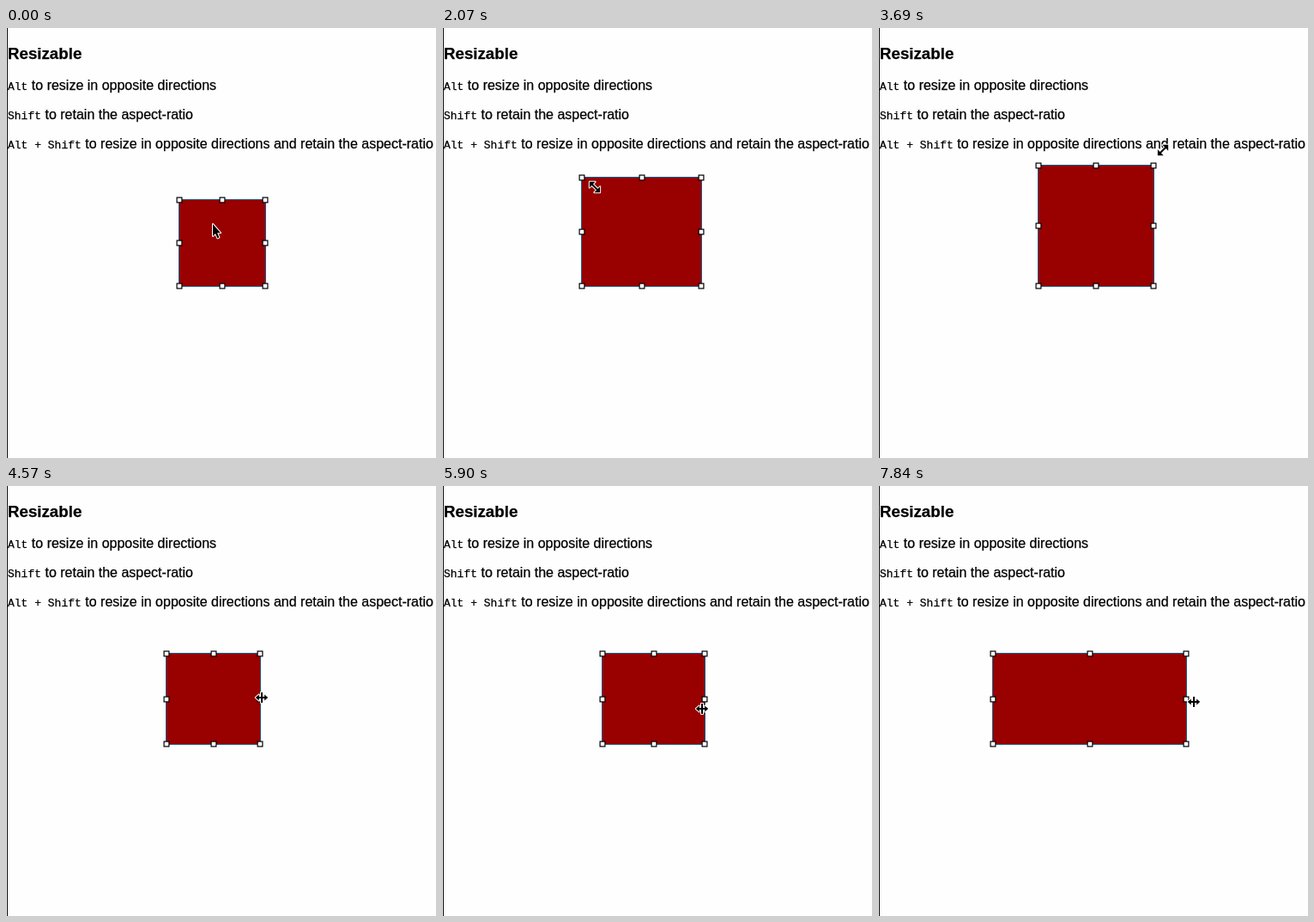
Animation of 501 by 500 pixels, one loop 7.99 s. Source, as an HTML page with a canvas:

```html
<!DOCTYPE html>
<html lang="en">
<head>
<meta charset="utf-8">
<title>Resizable</title>
<style>
  html, body { margin: 0; width: 100%; height: 100%; overflow: hidden; background: #fefefe; }
  svg, canvas { position: absolute; left: 0; top: 0; width: 501px; height: 500px; }
  text { font: 16px "Liberation Sans", Arial, sans-serif; fill: #000; stroke: #000; stroke-width: 0.25px; }
  .title { font-size: 18.72px; font-weight: bold; }
  .key { font: 13px "Liberation Mono", "Courier New", monospace; }
</style>
</head>
<body>
<svg viewBox="0 0 501 500">
  <rect x="1" y="0" width="1" height="500"/>
  <text class="title" x="2" y="36">Resizable</text>
  <text x="2" y="72"><tspan class="key">Alt</tspan> to resize in opposite directions</text>
  <text x="2" y="106"><tspan class="key">Shift</tspan> to retain the aspect-ratio</text>
  <text x="2" y="140"><tspan class="key">Alt + Shift</tspan> to resize in opposite directions and retain the aspect-ratio</text>
</svg>
<canvas id="stage" width="501" height="500"></canvas>
<script>
const ctx = document.getElementById('stage').getContext('2d');
const LOOP = 7990;
const STEP = 146;  // ms between pointer updates
const LAG = 0.6;   // steps the box trails behind the pointer

// Straight pointer move over a number of steps.
const hover = (from, steps, a, b) => ({ from, steps, path: [[0, ...a], [steps - 1, ...b]] });

// Pointer path as [step, x, y]; the held edges follow it.
const drag = (from, steps, kind, edges, grip, path, alt) => ({ from, steps, kind, edges, grip, path, alt });

const gestures = [
  hover(150, 5, [248, 226], [204, 201]),
  drag(1340, 8, 'nwse', 'lt', [4, 3],
    [[0, 197, 197], [2.6, 92, 136], [4, 146, 162], [5, 178, 185], [6, 183, 192]]),
  hover(2660, 6, [205, 198], [302, 195]),
  drag(3690, 6, 'nesw', 'rt', [0, 0],
    [[-1, 314, 172], [0, 332, 142], [1, 347, 130], [4.4, 296, 195]]),
  hover(4570, 4, [298, 246], [292, 258]),
  drag(5300, 5, 'ew', 'r', [3, 0],
    [[-1, 300, 259], [0, 330, 259], [1.4, 407, 259], [3.4, 303, 259]]),
  hover(6650, 2, [302, 260], [304, 256]),
  hover(7240, 2, [303, 253], [304, 251]),
  drag(7690, 2, 'ew', 'r', [3, 0], [[-1, 328, 251], [1, 368, 251]], true)
];

function pointAt(path, step) {
  const next = path.findIndex(k => k[0] >= step);
  if (next <= 0) return path.at(next).slice(1);
  const a = path[next - 1], b = path[next];
  const u = (step - a[0]) / (b[0] - a[0]);
  return [1, 2].map(i => Math.round(a[i] + (b[i] - a[i]) * u));
}

function resize(box, { edges, grip, path, alt }, step) {
  const [x, y] = pointAt(path, step - LAG);
  const sum = box.l + box.r;
  if (edges.includes('l')) box.l = x + grip[0];
  if (edges.includes('r')) box.r = x + grip[0];
  if (edges.includes('t')) box.t = y + grip[1];
  if (alt) box.l = sum - box.r;
}

// Pointer shape for whichever handle is underneath.
function kindOver(box, x, y) {
  const near = (a, b) => Math.abs(a - b) < 8;
  if (near(x, box.l) && near(y, box.t)) return 'nwse';
  if (near(x, box.r)) return near(y, box.t) ? 'nesw' : 'ew';
  return 'arrow';
}

function stateAt(t) {
  const box = { l: 202, t: 200, r: 302, b: 300 };
  let x = 240, y = 227, kind = 'arrow';
  for (const g of gestures) {
    if (t < g.from) break;
    const step = Math.min(g.steps - 1, Math.floor((t - g.from) / STEP + 0.05));
    [x, y] = pointAt(g.path, step);
    if (g.edges) resize(box, g, step);
    kind = g.kind || kindOver(box, x, y);
  }
  return { box, x, y, kind };
}

function square(x, y, size, color) {
  ctx.fillStyle = color;
  ctx.fillRect(x - size / 2, y - size / 2, size, size);
}

function drawBox({ l, t, r, b }) {
  ctx.fillStyle = '#990000';
  ctx.fillRect(l - 1, t - 1, r - l + 1, b - t + 1);
  ctx.strokeStyle = '#1c5f8a';
  ctx.lineWidth = 1;
  ctx.strokeRect(l - 0.5, t - 0.5, r - l + 1, b - t + 1);

  for (const v of [0, 0.5, 1]) {
    for (const u of [0, 0.5, 1]) {
      if (u === 0.5 && v === 0.5) continue;
      const x = l + Math.round((r - l) * u), y = t + Math.round((b - t) * v);
      square(x, y, 7, '#000');
      square(x, y, 4.6, '#fff');
    }
  }
}

function polygon(points) {
  const path = new Path2D();
  points.forEach(([x, y]) => path.lineTo(x, y));
  path.closePath();
  return path;
}

function doubleArrow(len, head, wide) {
  const half = [[-len, 0], [head - len, -wide], [head - len, -1], [len - head, -1], [len - head, -wide]];
  return polygon([...half, ...half.map(([x, y]) => [-x, -y])]);
}

const arrow = polygon([[1, 1], [1, 15], [4, 12], [6.4, 17.4], [8.4, 16.5], [6.1, 11.2], [10, 11.2]]);
const diagonal = doubleArrow(8.7, 4.8, 4.8);
const sideways = doubleArrow(7.2, 4, 3.5);
sideways.rect(-1, -6, 2, 12);

function drawPointer({ kind, x, y }) {
  const shape = { arrow, ew: sideways }[kind] || diagonal;
  const turn = { nwse: Math.PI / 4, nesw: -Math.PI / 4 }[kind] || 0;
  ctx.save();
  ctx.translate(x, y);
  ctx.rotate(turn);
  ctx.lineWidth = 2;
  ctx.lineJoin = 'round';
  ctx.strokeStyle = '#fff';
  ctx.stroke(shape);
  ctx.fillStyle = '#000';
  ctx.fill(shape);
  ctx.restore();
}

const start = performance.now();

function frame(now) {
  const state = stateAt(Math.max(0, now - start) % LOOP);
  ctx.clearRect(0, 0, 501, 500);
  drawBox(state.box);
  drawPointer(state);
  requestAnimationFrame(frame);
}

frame(start);
</script>
</body>
</html>
```
